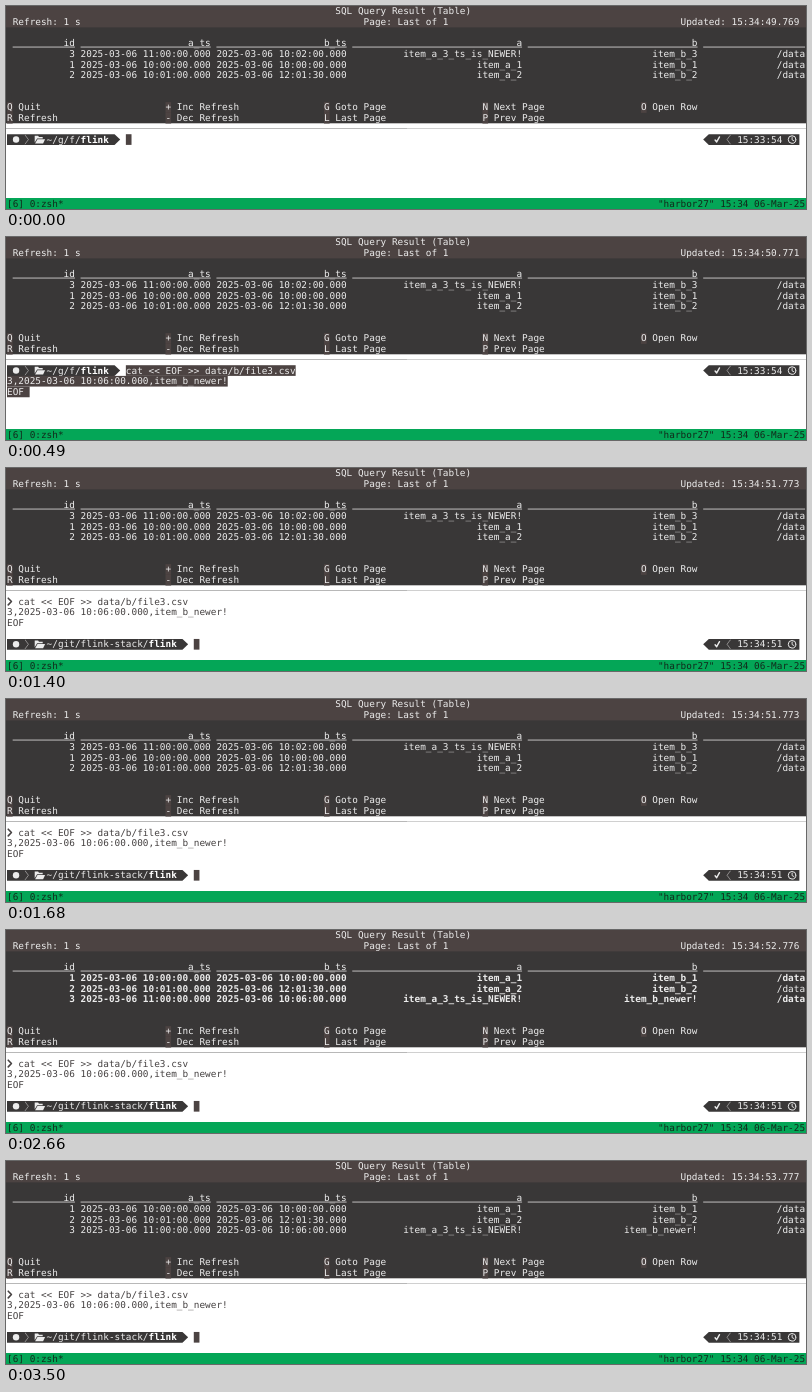
These frames come from a looping animation (800 px wide and 203 px high, 4.34 s). An HTML page with a canvas:

```html
<!DOCTYPE html>
<html lang="en">
<head>
<meta charset="utf-8">
<title>SQL Query Result</title>
<style>
  html, body { margin: 0; width: 100%; height: 100%; overflow: hidden; background: #fff; }
  canvas { display: block; width: 800px; height: 203px; }
</style>
</head>
<body>
<canvas id="stage" width="800" height="203"></canvas>
<script>
const ctx = document.getElementById('stage').getContext('2d');
const LOOP = 4340, CW = 5.66, RH = 203 / 19, COLS = 141;
const DARK = '#393737', WARM = '#4c4342', LIGHT = '#ececec', INK = '#454141', GREEN = '#04a657';
const FONT = '9.4px "DejaVu Sans Mono", "Noto Sans Mono", monospace';

const X = col => 1 + col * CW;
const Y = row => row * RH;

function box(x, y, w, h, color) {
  ctx.fillStyle = color;
  ctx.fillRect(x, y, w, h);
}

function cells(col, row, count, color) {
  box(X(col), Y(row), count * CW, RH, color);
}

// Every character sits in its own terminal cell.
function text(str, col, row, color = LIGHT, bold = false) {
  ctx.font = (bold ? 'bold ' : '') + FONT;
  ctx.fillStyle = color;
  [...str].forEach((ch, i) => {
    if (ch !== ' ') ctx.fillText(ch, X(col + i), Y(row) + 8.3);
  });
}

function textRight(str, end, row, color, bold) {
  text(str, end - str.length, row, color, bold);
}

function path(points, close) {
  ctx.beginPath();
  points.forEach(([x, y]) => ctx.lineTo(x, y));
  if (close) ctx.closePath();
}

function fillPath(points, color) {
  path(points, true);
  ctx.fillStyle = color;
  ctx.fill();
}

function strokePath(points, color, width) {
  path(points);
  ctx.strokeStyle = color;
  ctx.lineWidth = width;
  ctx.stroke();
}

function chevron(col, row, dir, color, width, pad) {
  const x = X(col) + CW / 2, y = Y(row);
  strokePath([
    [x - 1.6 * dir, y + pad],
    [x + 1.6 * dir, y + RH / 2],
    [x - 1.6 * dir, y + RH - pad]
  ], color, width);
}

function folder(col, row) {
  const x = X(col) - 0.6, y = Y(row) + 1.6;
  fillPath([[x, y], [x + 3.4, y], [x + 4.3, y + 1.3], [x + 8, y + 1.3], [x + 8, y + 2.7],
    [x + 2.4, y + 2.7], [x, y + 6.6]], LIGHT);
  fillPath([[x + 2.8, y + 3.4], [x + 10.4, y + 3.4], [x + 8.4, y + 7.6], [x + 0.4, y + 7.6]], LIGHT);
}

function clock(x, y) {
  ctx.beginPath();
  ctx.arc(x, y, 3.8, 0, Math.PI * 2);
  ctx.strokeStyle = LIGHT;
  ctx.lineWidth = 1;
  ctx.stroke();
  strokePath([[x, y - 2.3], [x, y + 0.3], [x + 1.8, y + 1.2]], LIGHT, 0.9);
}

function prompt(row, dir, time) {
  const y = Y(row), mid = y + RH / 2;
  const end = X(7 + dir.length + 5 + 1);
  fillPath([[1, y], [end, y], [end + CW, mid], [end, y + RH], [1, y + RH]], DARK);
  ctx.beginPath();
  ctx.arc(X(1) + 3.4, mid, 3.2, 0, Math.PI * 2);
  ctx.fillStyle = LIGHT;
  ctx.fill();
  chevron(3, row, 1, '#a5a3a3', 0.8, 1);
  folder(5, row);
  text(dir, 7, row);
  text('flink', 7 + dir.length, row, '#fff', true);

  const left = X(123), right = X(140);
  fillPath([[left, mid], [left + CW, y], [right, y], [right, y + RH], [left + CW, y + RH]], DARK);
  const cx = X(125);
  strokePath([[cx + 0.6, mid + 0.4], [cx + 2.2, mid + 2.4], [cx + 5, mid - 2.6]], LIGHT, 1.4);
  chevron(127, row, -1, '#a5a3a3', 0.8, 1);
  text(time, 129, row);
  clock(X(138) + 4, mid);
}

const ENDS = [12, 36, 60, 91, 122];
const HEADS = ['id', 'a_ts', 'b_ts', 'a', 'b'];
const day = time => '2025-03-06 ' + time + '.000';
const ROW1 = ['1', day('10:00:00'), day('10:00:00'), 'item_a_1', 'item_b_1'];
const ROW2 = ['2', day('10:01:00'), day('12:01:30'), 'item_a_2', 'item_b_2'];
const row3 = (time, b) => ['3', day('11:00:00'), day(time), 'item_a_3_ts_is_NEWER!', b];
const BEFORE = [row3('10:02:00', 'item_b_3'), ROW1, ROW2];
const AFTER = [ROW1, ROW2, row3('10:06:00', 'item_b_newer!')];
const KEYS = [
  ['Q Quit', '+ Inc Refresh', 'G Goto Page', 'N Next Page', 'O Open Row'],
  ['R Refresh', '- Dec Refresh', 'L Last Page', 'P Prev Page']
];
const COMMAND = ['cat << EOF >> data/b/file3.csv', '3,2025-03-06 10:06:00.000,item_b_newer!', 'EOF'];

function updated(t) {
  if (t < 420) return '49.769';
  if (t < 1400) return '50.771';
  if (t < 2380) return '51.773';
  return t < 3430 ? '52.776' : '53.777';
}

function table(t) {
  box(0, 0, 800, 117.3, DARK);
  box(0, 0, 800, 2 * RH, WARM);
  text('SQL Query Result (Table)', 58, 0);
  text('Refresh: 1 s', 1, 1);
  text('Page: Last of 1', 63, 1);
  textRight('Updated: 15:34:' + updated(t), COLS - 1, 1);

  let start = 1;
  HEADS.forEach((head, i) => {
    textRight(head, ENDS[i], 3);
    box(X(start), 40.6, (ENDS[i] - start) * CW, 0.9, '#cfcdcd');
    start = ENDS[i] + 1;
  });
  box(X(start), 40.6, (COLS - start) * CW, 0.9, '#cfcdcd');

  const fresh = t >= 2380 && t < 3430;
  (t < 2380 ? BEFORE : AFTER).forEach((row, r) => {
    row.forEach((cell, i) => textRight(cell, ENDS[i], 4 + r, LIGHT, fresh));
    textRight('/data', COLS, 4 + r, LIGHT, fresh && r !== 1);
  });

  KEYS.forEach((line, r) => line.forEach((item, i) => {
    cells(28 * i, 9 + r, 1, WARM);
    text(item, 28 * i, 9 + r);
  }));
}

function shell(t) {
  if (t >= 1260) {
    chevron(0, 12, 1, INK, 1.6, 2);
    COMMAND.forEach((line, i) => text(line, i ? 0 : 2, 12 + i, INK));
    prompt(16, '~/git/flink-stack/', '15:34:51');
    cells(33, 16, 1, WARM);
    return;
  }
  prompt(12, '~/g/f/', '15:33:54');
  if (t < 210) {
    cells(21, 12, 1, WARM);
    return;
  }
  COMMAND.forEach((line, i) => {
    const col = i ? 0 : 21;
    cells(col, 12 + i, line.length + (i === 2 ? 1 : 0), WARM);
    text(line, col, 12 + i);
  });
}

function draw(t) {
  box(0, 0, 800, 203, '#fff');
  table(t);
  box(0, 122, 401, 1, '#b8b8b8');
  box(401, 122, 399, 1, '#d0d0d0');
  shell(t);
  box(0, 192, 800, 11, GREEN);
  text('[6] 0:zsh*', 0, 18, '#12291b');
  textRight('"harbor27" 15:34 06-Mar-25', COLS, 18, '#12291b');
}

ctx.textRendering = 'geometricPrecision';
ctx.lineJoin = ctx.lineCap = 'round';
const begin = performance.now();
function frame() {
  draw((performance.now() - begin) % LOOP);
  requestAnimationFrame(frame);
}
frame();
</script>
</body>
</html>
```
